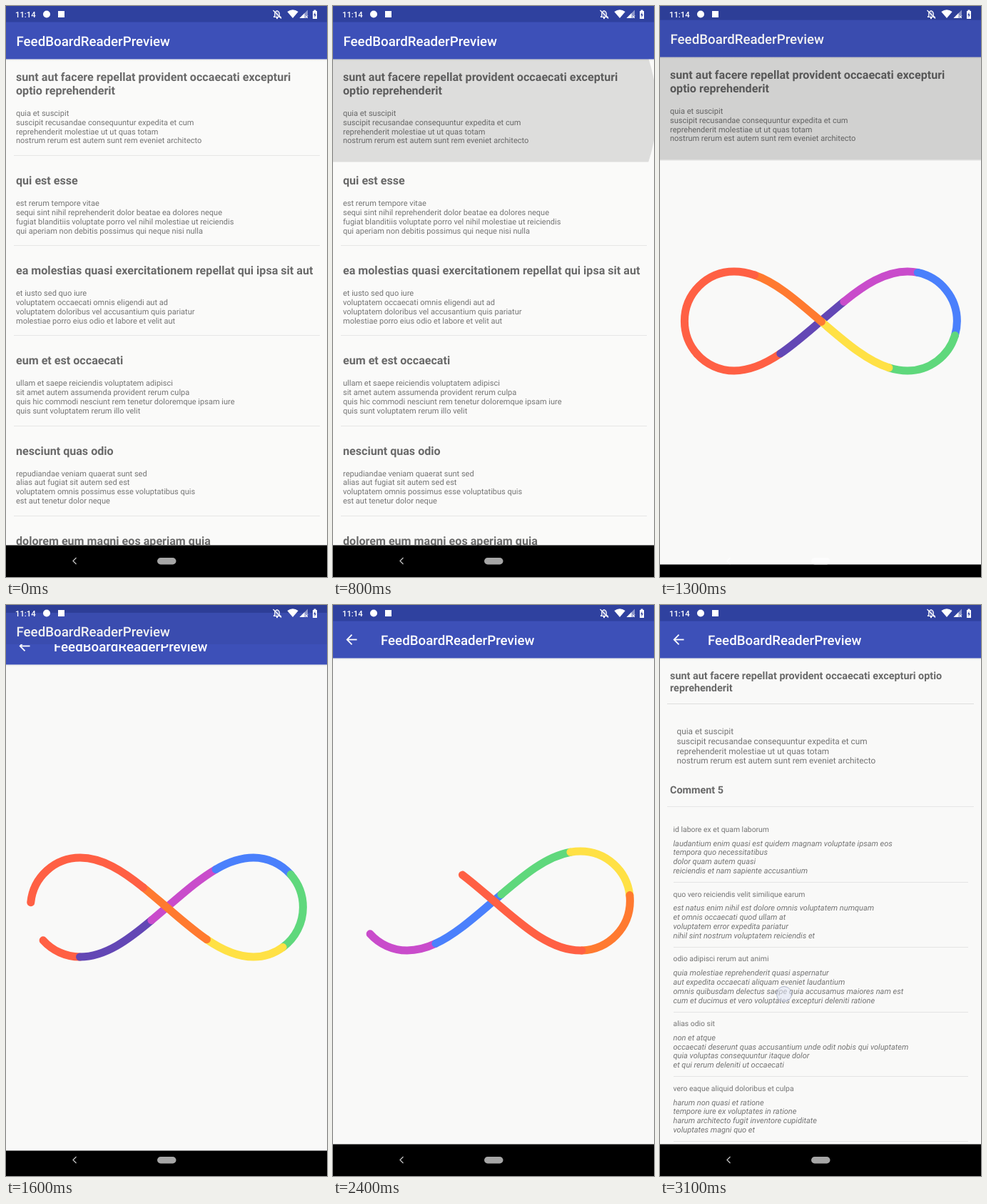
Animation of 450 by 800 pixels, one loop 4100 ms. Source, as an HTML page with a canvas:

```html
<!DOCTYPE html>
<html lang="en">
<head>
<meta charset="utf-8">
<title>Feed reader</title>
<style>
html, body { margin: 0; width: 100%; height: 100%; overflow: hidden; background: #000; }
canvas { display: block; width: 450px; height: 800px; }
</style>
</head>
<body>
<canvas id="stage" width="450" height="800"></canvas>
<script>
const ctx = document.getElementById('stage').getContext('2d');
ctx.textRendering = 'geometricPrecision';
const W = 450, H = 800, LOOP = 4100, STEP = 100;
const BAR_END = 74.5, NAV_TOP = 755.5;
const APP = 'FeedBoardReaderPreview';
const PAPER = '#fafaf9', HEADING = '#696969', BODY = '#747474';

const posts = [
  ['sunt aut facere repellat provident occaecati excepturi|optio reprehenderit',
   'quia et suscipit|suscipit recusandae consequuntur expedita et cum|reprehenderit molestiae ut ut quas totam|nostrum rerum est autem sunt rem eveniet architecto'],
  ['qui est esse',
   'est rerum tempore vitae|sequi sint nihil reprehenderit dolor beatae ea dolores neque|fugiat blanditiis voluptate porro vel nihil molestiae ut reiciendis|qui aperiam non debitis possimus qui neque nisi nulla'],
  ['ea molestias quasi exercitationem repellat qui ipsa sit aut',
   'et iusto sed quo iure|voluptatem occaecati omnis eligendi aut ad|voluptatem doloribus vel accusantium quis pariatur|molestiae porro eius odio et labore et velit aut'],
  ['eum et est occaecati',
   'ullam et saepe reiciendis voluptatem adipisci|sit amet autem assumenda provident rerum culpa|quis hic commodi nesciunt rem tenetur doloremque ipsam iure|quis sunt voluptatem rerum illo velit'],
  ['nesciunt quas odio',
   'repudiandae veniam quaerat sunt sed|alias aut fugiat sit autem sed est|voluptatem omnis possimus esse voluptatibus quis|est aut tenetur dolor neque'],
  ['dolorem eum magni eos aperiam quia', '']
];

const comments = [
  ['id labore ex et quam laborum',
   'laudantium enim quasi est quidem magnam voluptate ipsam eos|tempora quo necessitatibus|dolor quam autem quasi|reiciendis et nam sapiente accusantium'],
  ['quo vero reiciendis velit similique earum',
   'est natus enim nihil est dolore omnis voluptatem numquam|et omnis occaecati quod ullam at|voluptatem error expedita pariatur|nihil sint nostrum voluptatem reiciendis et'],
  ['odio adipisci rerum aut animi',
   'quia molestiae reprehenderit quasi aspernatur|aut expedita occaecati aliquam eveniet laudantium|omnis quibusdam delectus saepe quia accusamus maiores nam est|cum et ducimus et vero voluptates excepturi deleniti ratione'],
  ['alias odio sit',
   'non et atque|occaecati deserunt quas accusantium unde odit nobis qui voluptatem|quia voluptas consequuntur itaque dolor|et qui rerum deleniti ut occaecati'],
  ['vero eaque aliquid doloribus et culpa',
   'harum non quasi et ratione|tempore iure ex voluptates in ratione|harum architecto fugit inventore cupiditate|voluptates magni quo et']
];

function rect(x, y, w, h, color) {
  ctx.fillStyle = color;
  ctx.fillRect(x, y, w, h);
}

function text(lines, x, y, size, style, color, pitch = size * 1.172) {
  ctx.font = `${style} ${size}px Roboto, sans-serif`;
  ctx.fillStyle = color;
  lines.split('|').forEach((line, i) => ctx.fillText(line, x, y + i * pitch));
}

function line(points, color, width) {
  ctx.beginPath();
  points.forEach(([x, y]) => ctx.lineTo(x, y));
  ctx.strokeStyle = color;
  ctx.lineWidth = width;
  ctx.stroke();
}

function shape(points, color) {
  ctx.beginPath();
  points.forEach(([x, y]) => ctx.lineTo(x, y));
  ctx.fillStyle = color;
  ctx.fill();
}

function disc(x, y, r, color) {
  ctx.beginPath();
  ctx.arc(x, y, r, 0, Math.PI * 2);
  ctx.fillStyle = color;
  ctx.fill();
}

// Linear interpolation through [time, value] keys.
function track(keys, t) {
  if (t <= keys[0][0]) return keys[0][1];
  for (let i = 1; i < keys.length; i++) {
    const [t0, a] = keys[i - 1], [t1, b] = keys[i];
    if (t <= t1) return a + (b - a) * (t - t0) / (t1 - t0);
  }
  return keys[keys.length - 1][1];
}

function appBar(withBack) {
  const shade = ctx.createLinearGradient(0, BAR_END, 0, BAR_END + 3);
  shade.addColorStop(0, 'rgba(0,0,0,.07)');
  shade.addColorStop(1, 'rgba(0,0,0,0)');
  rect(0, BAR_END, W, 3, shade);
  rect(0, 0, W, BAR_END, '#3d50b8');
  rect(0, 0, W, 22.5, '#2f419f');
  if (withBack) {
    line([[33.5, 48.5], [20, 48.5]], '#fff', 1.8);
    line([[26.5, 41.7], [19.7, 48.5], [26.5, 55.3]], '#fff', 1.8);
  }
  text(APP, withBack ? 67 : 14.5, 55.7, 18.7, '500', '#fff');
}

function ripple(t) {
  if (t < 400) return;
  const p = Math.min(1, (t - 400) / 450);
  const ease = 1 - (1 - p) ** 2;
  ctx.save();
  ctx.beginPath();
  ctx.rect(0, 74, W, 144.5);
  ctx.clip();
  disc(120 + 102 * ease, 146, p < 1 ? 236 * ease : W, `rgba(0,0,0,${0.12 * ease})`);
  ctx.restore();
}

function listScreen(t) {
  rect(0, 0, W, H, PAPER);
  posts.forEach(([title, body], i) => {
    const y = i * 126.2;
    text(title, 14, (i ? 123.8 : 105.4) + y, 16.1, 'bold', HEADING, 18.5);
    text(body, 14, 153.8 + y, 11.03, 'normal', BODY, 12.85);
    if (i || t < 500) rect(11, Math.round(209 + y), 429, 1, '#e6e6e6');
  });
  ripple(t);
  appBar(false);
  rect(0, NAV_TOP, W, H - NAV_TOP, '#000');
}

const loop = new Path2D();
loop.arc(103.5, 415, 69.5, 2.412, Math.PI / 2, true);
loop.bezierCurveTo(147, 484.5, 186, 448, 225, 415);
loop.bezierCurveTo(264, 382, 303, 345.5, 346.5, 345.5);
loop.arc(346.5, 415, 69.5, -Math.PI / 2, Math.PI / 2);
loop.bezierCurveTo(303, 484.5, 264, 448, 225, 415);
loop.bezierCurveTo(186, 382, 147, 345.5, 103.5, 345.5);
loop.arc(103.5, 415, 69.5, -Math.PI / 2, 2.412, true);

const RED = '#ff6044';
const bands = ['#6347b5', '#c94ccb', '#4a80fc', '#5fd87c', '#ffe145', '#ff7a30'];

function loader(t) {
  const BAND = 115;
  const tail = 856 - 0.235 * (t - 2000);
  const head = tail - 892;
  const dash = (from, to, color) => {
    const start = Math.max(0, from);
    if (to <= start) return;
    ctx.setLineDash([to - start, 3000]);
    ctx.lineDashOffset = -start;
    ctx.strokeStyle = color;
    ctx.stroke(loop);
  };
  ctx.save();
  ctx.translate(0.4, -0.5);
  ctx.lineWidth = 11;
  ctx.lineCap = 'round';
  dash(0, head, RED);
  bands.forEach((color, i) => dash(head + i * BAND, head + (i + 1) * BAND, color));
  dash(head + bands.length * BAND, tail, RED);
  ctx.restore();
}

function details(t) {
  text('sunt aut facere repellat provident occaecati excepturi optio|reprehenderit', 14, 103.9, 14.4, 'bold', HEADING);
  rect(10, 138, 430, 1, '#dedede');
  text(posts[0][1], 23.5, 181, 11.8, 'normal', BODY);
  text('Comment 5', 14, 264.3, 14.4, 'bold', HEADING);
  rect(10, 282, 430, 1, '#e6e6e6');
  comments.forEach(([title, body], i) => {
    const y = i * 90.75;
    text(title, 18.5, 317.8 + y, 10.4, 'normal', BODY);
    text(body, 18.5, 337.6 + y, 11, 'italic', BODY, 12.8);
    rect(19, Math.round(388 + y), 413, 1, '#e4e4e4');
  });
  if (t >= 3000) {
    disc(174, t < 3100 ? 555 : 545, 10.5, 'rgba(225,229,245,.55)');
    ctx.strokeStyle = 'rgba(150,158,190,.65)';
    ctx.lineWidth = 1;
    ctx.stroke();
  }
}

function detailScreen(t) {
  rect(0, 0, W, H, '#f9f9f8');
  if (t < 2800) loader(t); else details(t);
  appBar(true);
  rect(0, NAV_TOP, W, H - NAV_TOP, '#000');
}

function systemIcons() {
  const white = '#fff';
  text('11:14', 13, 15.7, 11.3, '500', white);
  disc(57, 11.5, 5, white);
  rect(73, 7, 9, 9, white);

  // Muted bell
  shape([[376.5, 15], [376.5, 10], [378, 7.5], [380, 6.5], [382, 7.5], [383.5, 10], [383.5, 15]], 'rgba(255,255,255,.25)');
  line([[375, 15.5], [376.7, 14], [376.7, 10], [378, 7.7], [380, 6.7], [382, 7.7], [383.3, 10], [383.3, 14], [385, 15.5], [375, 15.5]], white, 1.1);
  line([[374.5, 6], [386, 17.5]], white, 1.2);
  disc(380, 17, 1.2, white);

  // Wi-Fi wedge
  ctx.beginPath();
  ctx.moveTo(402, 17);
  ctx.lineTo(394.3, 8);
  ctx.quadraticCurveTo(402, 2.5, 409.7, 8);
  ctx.fillStyle = white;
  ctx.fill();

  // Signal and battery
  shape([[411.5, 17], [423, 5.5], [423, 17]], 'rgba(255,255,255,.45)');
  shape([[411.5, 17], [418.5, 10], [418.5, 17]], white);
  line([[419.5, 13.5], [423, 17]], white, 1);
  line([[423, 13.5], [419.5, 17]], white, 1);
  rect(430, 7, 6, 11, white);
  rect(431.5, 5.5, 3, 2, white);
  shape([[433.3, 8.5], [431.3, 13], [432.7, 13], [432.5, 16.5], [434.8, 11.8], [433.3, 11.8]], '#2f419f');

  // Navigation
  line([[98.5, 773], [94, 777.5], [98.5, 782]], 'rgba(255,255,255,.75)', 1.3);
  ctx.beginPath();
  ctx.roundRect(212, 773, 26.5, 9.5, 4.75);
  ctx.fillStyle = 'rgba(255,255,255,.65)';
  ctx.fill();
}

const slideKeys = [[1200, 33], [1300, 27], [1400, 20], [1500, 13.5], [1600, 9], [1800, 3.5], [2000, 1], [2200, 0]];
const revealKeys = [[1200, 600], [1300, 217], [1400, 140], [1600, 55], [1800, 14], [2000, 0]];

function draw(t) {
  rect(0, 0, W, H, '#000');
  const slide = track(slideKeys, t);
  if (t < 2100) {
    const left = (33 - slide) / 33;
    ctx.save();
    ctx.translate(0, -16 * left);
    listScreen(t);
    ctx.restore();
    if (t >= 1200) rect(0, 0, W, H, `rgba(0,0,0,${Math.min(0.05, left * 0.3)})`);
  }
  if (t >= 1200) {
    const top = track(revealKeys, t);
    ctx.save();
    ctx.beginPath();
    ctx.rect(0, top, W, H - top);
    ctx.clip();
    ctx.translate(0, slide);
    detailScreen(t);
    ctx.restore();
  }
  systemIcons();
}

const begin = performance.now();
function tick() {
  const t = (performance.now() - begin) % LOOP;
  draw(Math.min(3100, Math.floor(t / STEP) * STEP));
  requestAnimationFrame(tick);
}
tick();
</script>
</body>
</html>
```
